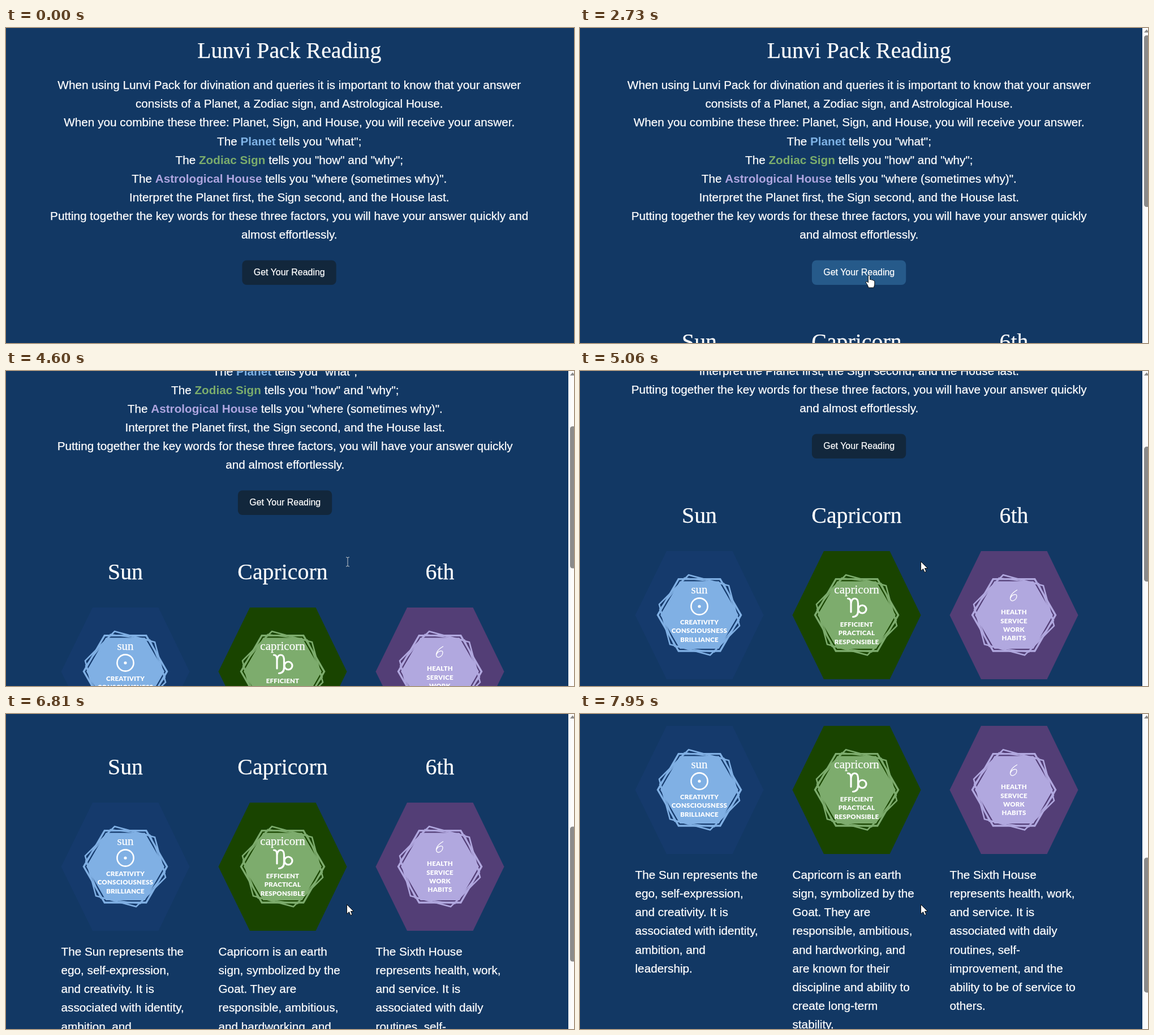
Animation, 1004 px wide and 558 px high, one loop 8000 ms. Source, as an HTML page:

```html
<!DOCTYPE html>
<html lang="en">
<head>
<meta charset="utf-8">
<title>Lunvi Pack Reading</title>
<style>
  html, body { margin: 0; width: 100%; height: 100%; overflow: hidden; background: #123864; }
  svg { display: block; width: 1004px; height: 558px; }
  text { fill: #fff; stroke: #fff; stroke-width: .25px; font: 20.72px "Liberation Sans", Arial, sans-serif; }
  .mid { text-anchor: middle; }
  .title { font: 39.85px "Liberation Serif", "Times New Roman", serif; }
  .label { font-size: 15.94px; }
  .name { font: 21px "Liberation Serif", serif; }
  .word { font: 900 11.5px Lato, sans-serif; letter-spacing: .2px; stroke: none; }
  .bold { font-weight: 700; stroke: none; }
  .line { fill: none; stroke: #fff; stroke-linecap: round; }
</style>
</head>
<body>
<svg viewBox="0 0 1004 558">
  <g id="page"><g id="intro"></g><g id="result"></g></g>
  <g id="bar">
    <rect x="994" width="10" height="558" fill="#fcfcfc"/>
    <path d="M997 8L1001.5 2.5L1006 8Z" fill="#8b8b8b"/>
    <rect id="thumb" x="997" width="12" rx="4.5" fill="#8b8b8b"/>
  </g>
  <g id="cursor">
    <path id="arrow" d="M0 0V16.5L4 13L6.6 19L9.4 17.8L6.9 12H12Z" fill="#fff" stroke="#111"/>
    <path id="hand" d="M-1.6 1.5Q0-1.5 1.6 1.5V8Q3.5 6.5 4.8 8.5 6.5 7.5 7.6 9.5 9.6 9 9.8 11V16Q9.5 19 8 22H-1Q-2 19-3 17L-5.6 13Q-5.8 10.6-3.6 11.2L-1.6 13Z" fill="#fff" stroke="#111"/>
    <path id="beam" d="M-3-8H-1L0-7L1-8H3M0-7V7M-3 8H-1L0 7L1 8H3" fill="none" stroke="#c4c8cc"/>
  </g>
  <circle id="click" cx="510" cy="437" r="15" fill="#ff0" fill-opacity=".47"/>
</svg>
<script>
const $ = id => document.getElementById(id);
const LINE = 33.15, CENTER = 500.75;
const text = (x, y, cls, s) => `<text x="${x}" y="${y}" class="${cls}">${s}</text>`;
const bold = (color, s) => `<tspan class="bold" fill="${color}" style="fill:${color}">${s}</tspan>`;
const lineY = (base, i) => Math.round(base + i * LINE);

const intro = [
  'When using Lunvi Pack for divination and queries it is important to know that your answer',
  'consists of a Planet, a Zodiac sign, and Astrological House.',
  'When you combine these three: Planet, Sign, and House, you will receive your answer.',
  `The ${bold('#7fb3e6', 'Planet')} tells you "what";`,
  `The ${bold('#7bac6c', 'Zodiac Sign')} tells you "how" and "why";`,
  `The ${bold('#aea5df', 'Astrological House')} tells you "where (sometimes why)".`,
  'Interpret the Planet first, the Sign second, and the House last.',
  '', ''
];
const wraps = [
  ['Putting together the key words for these three factors, you will have your answer quickly and', 'almost effortlessly.'],
  ['Putting together the key words for these three factors, you will have your answer quickly', 'and almost effortlessly.']
];

$('intro').innerHTML = text(CENTER, 53, 'mid title', 'Lunvi Pack Reading') +
  intro.map((s, i) => text(CENTER, lineY(108.15, i), 'mid', s)).join('') +
  `<rect id="button" x="417.4" y="411.5" width="166.3" height="43.5" rx="8"/>` +
  text(CENTER, 438, 'mid label', 'Get Your Reading');
const wrapLines = [...$('intro').querySelectorAll('text')].slice(8, 10);

const cards = [
  { x: 97.5, title: 'Sun', back: '#153a6c', ink: '#80b0e4', name: 'sun', wordY: 130,
    words: ['CREATIVITY', 'CONSCIOUSNESS', 'BRILLIANCE'],
    sign: '<circle class="line" cx="113.5" cy="98" r="14.6" stroke-width="2.6"/><circle cx="113.5" cy="98" r="2.6" fill="#fff"/>',
    about: ['The Sun represents the', 'ego, self-expression,', 'and creativity. It is', 'associated with identity,', 'ambition, and', 'leadership.'] },
  { x: 375.5, title: 'Capricorn', back: '#194400', ink: '#7dac6d', name: 'capricorn', wordY: 133.7,
    words: ['EFFICIENT', 'PRACTICAL', 'RESPONSIBLE'],
    sign: '<g class="line" stroke-width="3.2"><path d="M98 84q5.5 0 5.5 8v16M103.5 93q1-9 6.5-9 6 0 6 9v13q0 10-9 10.5"/><circle cx="123.5" cy="103" r="7"/></g>',
    about: ['Capricorn is an earth', 'sign, symbolized by the', 'Goat. They are', 'responsible, ambitious,', 'and hardworking, and', 'are known for their', 'discipline and ability to', 'create long-term', 'stability.'] },
  { x: 653.5, title: '6th', back: '#533e76', ink: '#b1a8df', name: '', wordY: 112.2,
    words: ['HEALTH', 'SERVICE', 'WORK', 'HABITS'],
    sign: '<path class="line" stroke-width="1.3" d="M119 69q-12 7-12 15 1 5 5 4 6-2 6.5-8 0-4-4-3-5 1-7 6"/>',
    about: ['The Sixth House', 'represents health, work,', 'and service. It is', 'associated with daily', 'routines, self-', 'improvement, and the', 'ability to be of service to', 'others.'] }
];

function hexagon(r, turn, attrs) {
  const points = [...Array(6).keys()].map(i => {
    const a = (turn + i * 60) * Math.PI / 180;
    return [113.5 + r * Math.cos(a), 113.3 + r * Math.sin(a)].map(v => v.toFixed(1));
  });
  return `<polygon points="${points.join(' ')}" ${attrs}/>`;
}
const ring = (r, turn, ink, w) => hexagon(r, turn, `fill="none" stroke="${ink}" stroke-width="${w}"`);

$('result').innerHTML = cards.map(c =>
  text(c.x + 113.5, 569, 'mid title', c.title) +
  `<g transform="translate(${c.x} 619)">
    <polygon points="55.5,0 172,0 227,113.5 172,227 55.5,227 0,113.5" fill="${c.back}"/>` +
  hexagon(69, 0, `fill="${c.ink}"`) +
  ring(73.5, 0, c.ink, 3.4) + ring(73.5, 15, c.ink, 2.6) + ring(71, 8, c.ink, 1.8) +
  text(113.5, 75, 'mid name', c.name) + c.sign +
  c.words.map((w, i) => text(113.5, c.wordY + i * 15.4, 'mid word', w)).join('') + '</g>' +
  c.about.map((s, i) => text(c.x, lineY(890, i), '', s)).join('')
).join('');

// Stepped tracks: [time, value], each value held until the next time.
const scrollTrack = [[0, 0], [4470, 14], [4535, 95], [4600, 200], [4660, 270], [4730, 300],
  [6670, 314], [6740, 390], [6810, 462], [6880, 500],
  [7740, 504], [7810, 535], [7880, 575], [7950, 598]];
const thumbTrack = [[0, 304], [2930, 289], [3130, 270], [3200, 251.5], [4930, 245], [5060, 239]];
const held = (track, t) => track.findLast(([time]) => time <= t)[1];

const LOAD = 2730;
const mix = (a, b, p) => a + (b - a) * p;
const clamp = p => Math.min(1, Math.max(0, p));
const show = (id, on) => $(id).setAttribute('display', on ? 'inline' : 'none');

function cursorAt(t) {
  if (t < 3530) {
    const p = Math.min(9, Math.floor((t - 790) / 67.7)) / 9, e = 1 - (1 - p) ** 2;
    return [mix(616, 511, e), mix(504, 438, e)];
  }
  const p = Math.min(6, Math.floor((t - 3530) / 68) + 1) / 6, e = p * p * (3 - 2 * p);
  return t < 4930 ? [mix(511, 604, e), mix(438, 338, e)] : [602.5, 337.5];
}

function shapeAt(t, [x, y]) {
  if (t >= 4930) return 'arrow';
  const shift = t < LOAD ? 0 : -7.5;
  if (x > 417 + shift && x < 584 + shift && y > 411 && y < 455) return 'hand';
  return y < 384 ? 'beam' : 'arrow';
}

function draw(t) {
  const loaded = t >= LOAD, scroll = held(scrollTrack, t), thumb = held(thumbTrack, t);
  $('page').setAttribute('transform', `translate(0 ${-scroll})`);
  $('intro').setAttribute('transform', `translate(${loaded ? -7.5 : 0} 0)`);
  wrapLines.forEach((el, i) => {
    const s = wraps[+loaded][i];
    if (el.textContent !== s) el.textContent = s;
  });
  show('result', loaded);
  show('bar', loaded);
  $('thumb').setAttribute('y', 13 + scroll * thumb / 592);
  $('thumb').setAttribute('height', thumb);

  const pos = cursorAt(t), shape = shapeAt(t, pos);
  show('cursor', t >= 790);
  $('cursor').setAttribute('transform', `translate(${pos})`);
  for (const id of ['arrow', 'hand', 'beam']) show(id, id === shape);
  show('click', t >= 2340 && t < LOAD);

  const hover = clamp((t - 1060) / 200) - clamp((t - 3640) / 200);
  const color = [[18, 38], [39, 90], [60, 138]].map(([a, b]) => Math.round(mix(a, b, hover)));
  $('button').setAttribute('fill', `rgb(${color})`);
}

function frame() {
  draw(performance.now() % 8000);
  requestAnimationFrame(frame);
}
frame();
</script>
</body>
</html>
```
